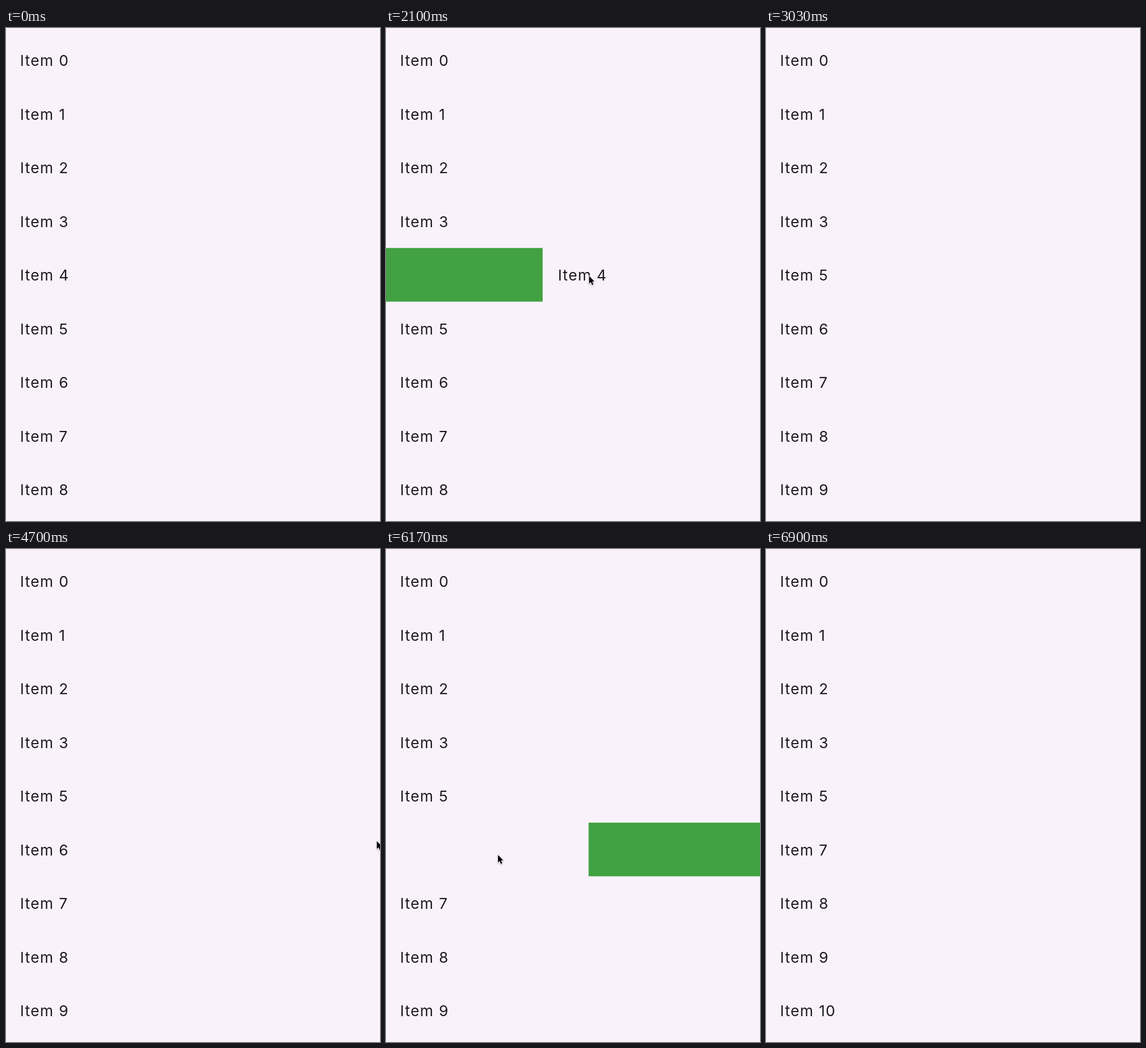
Recreate the animation shown at these times as an HTML page. Size 652 px wide and 859 px high, loop 8260 ms.

```html
<!DOCTYPE html>
<html lang="en">
<head>
<meta charset="utf-8">
<title>Swipe to dismiss</title>
<style>
  html, body { margin: 0; width: 100%; height: 100%; overflow: hidden; background: #f9f2fa; }
  svg { display: block; width: 100vw; height: 100vh; }
  text { font: 400 26.2px Inter, Roboto, sans-serif; letter-spacing: 1.25px; fill: #1d1b20; }
  #cursor { filter: drop-shadow(0 1px 1px rgba(0, 0, 0, .3)); }
</style>
</head>
<body>
<svg viewBox="0 0 652 859">
  <rect width="652" height="859" fill="#f9f2fa"/>
  <g id="list"></g>
  <path id="cursor" d="M0 0V13.4L3 10.6L5.2 15.7L7.5 14.7L5.3 9.8L9.3 9.5Z"
        fill="#000" stroke="#fff" stroke-width="1.8" stroke-linejoin="round" paint-order="stroke"/>
</svg>
<script>
const LOOP = 8260, ROW = 93.5, TOP = 9.3, WIDTH = 655, SLOP = 38, COLLAPSE = 180;
const SVG = 'http://www.w3.org/2000/svg';

const clamp = v => Math.max(0, Math.min(1, v));
const mix = (a, b, u) => a + (b - a) * u;
const smooth = u => u * u * (3 - 2 * u);
const easeOut = u => 1 - (1 - u) ** 2;
const progress = (t, from, to) => clamp((t - from) / (to - from));

// The pointer enters, rests, then drags one row; the row flies out and collapses.
const swipes = [
  {
    item: 4, dir: 1, y: 432, release: 2400, done: 2630, collapse: 2769,
    enter: { start: 270, end: 900, x: 613, y: 168, ease: smooth },
    drag: { start: 1300, end: 2900, from: 41, to: 666 }
  },
  {
    item: 6, dir: -1, y: 533, release: 6400, done: 6590, collapse: 6715,
    enter: { start: 4700, end: 5130, x: 647, y: 509, ease: easeOut },
    drag: { start: 5330, end: 6830, from: 533, to: -39 }
  }
];

// CSS "ease": solves cubic-bezier(.25, .1, .25, 1) by bisection
function ease(x) {
  if (x <= 0 || x >= 1) return clamp(x);
  let lo = 0, hi = 1;
  for (let i = 0; i < 24; i++) {
    const m = (lo + hi) / 2;
    if (.75 * m * (1 - m) + m ** 3 < x) lo = m; else hi = m;
  }
  return .3 * lo * (1 - lo) ** 2 + 3 * lo * lo * (1 - lo) + lo ** 3;
}

const dragX = ({ drag }, t) =>
  mix(drag.from, drag.to, smooth(progress(t, drag.start, drag.end)));

function pointer(s, t) {
  const u = s.enter.ease(progress(t, s.enter.start, s.enter.end));
  return [mix(s.enter.x, dragX(s, t), u), mix(s.enter.y, s.y, u)];
}

function offset(s, t) {
  const x = dragX(s, Math.min(t, s.release));
  const pulled = Math.max(0, (x - s.drag.from) * s.dir - SLOP);
  return mix(pulled, WIDTH, 1 - (1 - progress(t, s.release, s.done)) ** 3.5);
}

const list = document.getElementById('list');
const cursor = document.getElementById('cursor');

function set(el, attrs) {
  for (const k in attrs) el.setAttribute(k, attrs[k]);
}

function add(tag, attrs = {}) {
  const el = document.createElementNS(SVG, tag);
  set(el, attrs);
  return list.appendChild(el);
}

for (const s of swipes) s.rect = add('rect', { fill: '#42a142' });
const labels = Array.from({ length: 11 }, (_, i) => {
  const el = add('text');
  el.textContent = 'Item ' + i;
  return el;
});

function draw(t) {
  let y = TOP;
  labels.forEach((label, i) => {
    const s = swipes.find(s => s.item === i);
    let x = 24.6, height = ROW;
    if (s) {
      const shift = offset(s, t);
      height *= 1 - ease((t - s.collapse) / COLLAPSE);
      x += shift * s.dir;
      set(s.rect, { x: s.dir > 0 ? -2 : 653 - shift, y, width: shift, height });
      label.style.display = t >= s.done ? 'none' : '';
    }
    set(label, { x, y: y + 56.7 });
    y += height;
  });

  const active = swipes.find(s => t >= s.enter.start && t < s.drag.end);
  cursor.style.display = active ? '' : 'none';
  if (active) set(cursor, { transform: `translate(${pointer(active, t)})` });
}

const begin = performance.now();
function tick() {
  draw((performance.now() - begin) % LOOP);
  requestAnimationFrame(tick);
}
tick();
</script>
</body>
</html>
```
